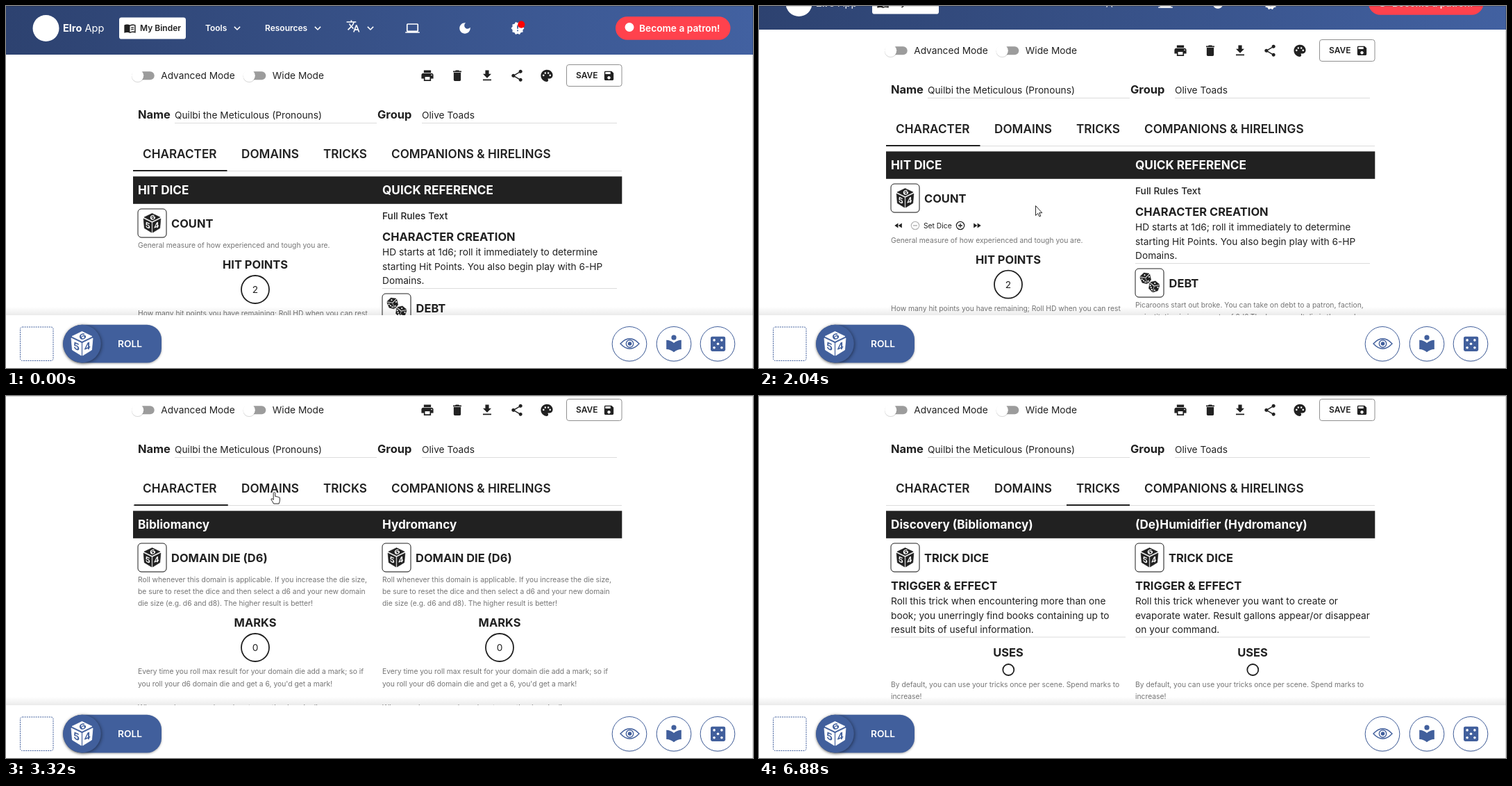
Recreate the animation shown at these times as an HTML page. Size 1076 by 521 pixels, loop 7560 ms.

```html
<!DOCTYPE html>
<html lang="en">
<head>
<meta charset="utf-8">
<title>Character sheet</title>
<style>
  html, body { margin: 0; width: 100%; height: 100%; overflow: hidden; background: #fff; }
  svg { display: block; width: 100%; height: 100%; font-family: Inter, "Open Sans", sans-serif; }
</style>
</head>
<body>
<svg id="stage" viewBox="0 0 1076 521"></svg>
<script>
const LOOP = 7560, TICK = 40;
const INK = '#212121', BLUE = '#415f9c', GREY = '#757575', LINE = '#dcdcdc';
const BODY = 13.73, SMALL = 10.3, LABEL = 16.47, TITLE = 17.16, BUTTON = 12.01;
const LEFT = 190, RIGHT = 542, GAP = 352;

const ICON = {
  print: 'M19 8H5c-1.66 0-3 1.34-3 3v6h4v4h12v-4h4v-6c0-1.66-1.34-3-3-3zm-3 11H8v-5h8v5zm3-7c-.55 0-1-.45-1-1s.45-1 1-1 1 .45 1 1-.45 1-1 1zm-1-9H6v4h12V3z',
  bin: 'M6 19c0 1.1.9 2 2 2h8c1.1 0 2-.9 2-2V7H6v12zM19 4h-3.5l-1-1h-5l-1 1H5v2h14V4z',
  download: 'M19 9h-4V3H9v6H5l7 7 7-7zM5 18v2h14v-2H5z',
  share: 'M18 16.08c-.76 0-1.44.3-1.96.77L8.91 12.7c.05-.23.09-.46.09-.7s-.04-.47-.09-.7l7.05-4.11c.54.5 1.25.81 2.04.81 1.66 0 3-1.34 3-3s-1.34-3-3-3-3 1.34-3 3c0 .24.04.47.09.7L8.04 9.81C7.5 9.31 6.79 9 6 9c-1.66 0-3 1.34-3 3s1.34 3 3 3c.79 0 1.5-.31 2.04-.81l7.12 4.16c-.05.21-.08.43-.08.65 0 1.61 1.31 2.92 2.92 2.92s2.92-1.31 2.92-2.92-1.31-2.92-2.92-2.92z',
  palette: 'M12 2C6.49 2 2 6.49 2 12s4.49 10 10 10c1.38 0 2.5-1.12 2.5-2.5 0-.61-.23-1.2-.64-1.67-.08-.1-.13-.21-.13-.33 0-.28.22-.5.5-.5H16c3.31 0 6-2.69 6-6 0-4.96-4.49-9-10-9zm5.5 11a1.5 1.5 0 1 1 0-3 1.5 1.5 0 0 1 0 3zm-3-4a1.5 1.5 0 1 1 0-3 1.5 1.5 0 0 1 0 3zM5 11.5a1.5 1.5 0 0 1 3 0 1.5 1.5 0 0 1-3 0zm3-4a1.5 1.5 0 0 1 3 0 1.5 1.5 0 0 1-3 0z',
  save: 'M17 3H5c-1.11 0-2 .9-2 2v14c0 1.1.89 2 2 2h14c1.1 0 2-.9 2-2V7l-4-4zm-5 16c-1.66 0-3-1.34-3-3s1.34-3 3-3 3 1.34 3 3-1.34 3-3 3zm3-10H5V5h10v4z',
  more: 'M16.59 8.59L12 13.17 7.41 8.59 6 10l6 6 6-6z',
  language: 'M12.87 15.07l-2.54-2.51.03-.03c1.74-1.94 2.98-4.17 3.71-6.53H17V4h-7V2H8v2H1v1.99h11.17C11.5 7.92 10.44 9.75 9 11.35 8.07 10.32 7.3 9.19 6.69 8h-2c.73 1.63 1.73 3.17 2.98 4.56l-5.09 5.02L4 19l5-5 3.11 3.11.76-2.04zM18.5 10h-2L12 22h2l1.12-3h4.75L21 22h2l-4.5-12zm-2.62 7l1.62-4.33L19.12 17h-3.24z',
  laptop: 'M20 18c1.1 0 2-.9 2-2V6c0-1.1-.9-2-2-2H4c-1.1 0-2 .9-2 2v10c0 1.1.9 2 2 2H0v2h24v-2h-4zM4 6h16v10H4V6z',
  moon: 'M12 3c-4.97 0-9 4.03-9 9s4.03 9 9 9 9-4.03 9-9c0-.46-.04-.92-.1-1.36-.98 1.37-2.58 2.26-4.4 2.26-2.98 0-5.4-2.42-5.4-5.4 0-1.81.89-3.42 2.26-4.4-.44-.06-.9-.1-1.36-.1z',
  news: 'M23 12l-2.44-2.78.34-3.68-3.61-.82-1.89-3.18L12 3 8.6 1.54 6.71 4.72l-3.61.81.34 3.68L1 12l2.44 2.78-.34 3.69 3.61.82 1.89 3.18L12 21l3.4 1.46 1.89-3.18 3.61-.82-.34-3.68L23 12zm-10 5h-2v-2h2v2zm0-4h-2V7h2v6z',
  book: 'M12 6C10.5 4.9 8.4 4.5 6.5 4.5S2.5 4.9 1 6v15.2C2.6 20.4 4.6 20 6.5 20s4 .4 5.5 1.5c1.4-.9 3.8-1.5 5.5-1.5s3.9.4 5.5 1.2V6c-1.5-1.1-3.6-1.5-5.5-1.5S13.5 4.9 12 6zm9 12.5c-2.7-.8-6.5-.5-9 1V8c2.5-1.5 6.3-1.8 9-1v11.5zM14 10.5q3-1.2 5.5-.7v1.5q-2.5-.4-5.5.8zm0 3.5q3-1.2 5.5-.7v1.5q-2.5-.4-5.5.8z',
  back: 'M11 18V6l-8.5 6 8.5 6zm.5-6l8.5 6V6l-8.5 6z',
  forward: 'M4 18l8.5-6L4 6v12zm9-12v12l8.5-6L13 6z',
  reader: 'M12 11.55C9.64 9.35 6.48 8 3 8v11c3.48 0 6.64 1.35 9 3.55 2.36-2.19 5.52-3.55 9-3.55V8c-3.48 0-6.64 1.35-9 3.55zM12 8a3 3 0 1 0 0-6 3 3 0 0 0 0 6z'
};

const icon = (name, x, y, s = .858, fill = INK) =>
  `<path d="${ICON[name]}" fill="${fill}" fill-rule="evenodd" transform="translate(${x} ${y}) scale(${s}) translate(-12 -12)"/>`;
const text = (s, x, y, size, fill = INK, weight = 400, anchor = 'start') =>
  `<text x="${x}" y="${y}" font-size="${size}" fill="${fill}" font-weight="${weight}" text-anchor="${anchor}">${s.replace(/&/g, '&amp;')}</text>`;
const semi = (s, x, y, size, fill = INK) => text(s, x, y, size, fill, 600);
const label = (s, x, y, anchor) => text(s, x, y, LABEL, INK, 700, anchor);
const lines = (list, x, y, size, step, fill) =>
  list.map((s, i) => text(s, x, y + i * step, size, fill)).join('');
const note = (list, x, y) => lines(list, x, y, SMALL, 17.1, GREY);
const para = (list, x, y) => lines(list, x, y, BODY, 20.6, INK);
const rect = (x, y, w, h, r, attrs) => `<rect x="${x}" y="${y}" width="${w}" height="${h}" rx="${r}" ${attrs}/>`;
const circle = (x, y, r, attrs) => `<circle cx="${x}" cy="${y}" r="${r}" ${attrs}/>`;
const rule = (x1, x2, y) => `<path d="M${x1} ${y}H${x2}" stroke="${LINE}"/>`;

// Cube marked with numerals, or with pips when spots is set
function die(x, y, s, fill, mark, turn = 0, spots = false) {
  const num = (n, m) =>
    `<text transform="${m}" font-size="14" font-weight="700" fill="${mark}" text-anchor="middle">${n}</text>`;
  const pips = [[0, -10.5], [-11.5, -1], [-8, 4.5], [-4.5, 10], [4.5, 10], [11.5, -1]]
    .map(p => circle(p[0], p[1], 2.2, `fill="${mark}"`)).join('');
  const faces = 'M0-17.5 14.5-10.5 0-3.5-14.5-10.5ZM-15.5-8-1-1V17L-14 9ZM15.5-8 1-1V17L14 9Z';
  return `<g transform="translate(${x} ${y}) rotate(${turn}) scale(${s})">
    <path d="${faces}" fill="${fill}" stroke="${fill}" stroke-width=".8" stroke-linejoin="round"/>
    ${spots ? pips : num(6, 'translate(2.5 -6.5) rotate(-24) scale(1.15 .8)')
      + num(5, 'translate(-7.8 9) skewY(24)') + num(4, 'translate(7.8 9) skewY(-24)')}
  </g>`;
}
const dieButton = (x, y, pair) =>
  rect(x + .5, y + 1, 41, 41, 5, 'fill="#000" opacity=".18"')
  + rect(x, y, 41, 41, 5, `fill="#fff" stroke="${INK}"`)
  + (pair ? die(x + 15, y + 14, .48, INK, '#fff', -18, true) + die(x + 27, y + 26, .48, INK, '#fff', 14, true)
          : die(x + 20.5, y + 20.5, .8, INK, '#fff'));
const ring = (x, y, r, s = '') =>
  circle(x, y, r, `fill="#fff" stroke="${INK}" stroke-width="1.8"`) + text(s, x, y + 5, BODY, INK, 400, 'middle');
const heads = (a, b) =>
  text(a, LEFT, 271.2, TITLE, '#fff', 700) + text(b, RIGHT, 271.2, TITLE, '#fff', 700);

function navBar() {
  const chevrons = [333, 449, 525].map(x => icon('more', x, 32, .78, '#fff')).join('');
  return rect(0, 0, 1076, 70, 0, 'fill="url(#nav)"')
    + circle(57.5, 32, 19, 'fill="#fff"')
    + text('Elro', 82, 37, 14.6, '#fff', 700) + text('App', 113.5, 37, 14.6, '#fff')
    + rect(163, 16.4, 96, 31.2, 3.4, 'fill="#fff"') + icon('book', 178.5, 32, .74) + semi('My Binder', 193, 36.3, BUTTON)
    + semi('Tools', 287, 36.3, BUTTON, '#fff') + semi('Resources', 373, 36.3, BUTTON, '#fff') + chevrons
    + icon('language', 500, 29, .858, '#fff') + icon('laptop', 585.5, 32, .858, '#fff')
    + icon('moon', 661, 32, .858, '#fff') + icon('news', 737, 32, .858, '#fff')
    + circle(742.3, 26.7, 5.1, 'fill="#f00"')
    + rect(878, 15.3, 165.5, 33.4, 16.7, 'fill="#ff424d"') + circle(898, 30.5, 6.5, 'fill="#fff"')
    + semi('Become a patron!', 912, 36.8, BODY, '#fff');
}

function sheetTop() {
  const toggle = (x, s) => rect(x - 3, 94.2, 27, 12, 6, 'fill="#9c9c9c"')
    + circle(x, 101.3, 8.8, 'fill="#000" opacity=".16"') + circle(x, 100.3, 8.6, 'fill="#fff"')
    + text(s, x + 33.5, 105, BODY);
  const tools = ['print', 'bin', 'download', 'share', 'palette'].map((n, i) => icon(n, 607 + i * 43, 100.3)).join('');
  const tabs = [['CHARACTER', 197], ['DOMAINS', 339], ['TRICKS', 457], ['COMPANIONS & HIRELINGS', 555]]
    .map(([s, x]) => semi(s, x, 219.2, TITLE)).join('');
  return toggle(189.7, 'Advanced Mode') + toggle(350.3, 'Wide Mode') + tools
    + rect(807.5, 84.5, 79.5, 31, 3.4, 'fill="#fff" stroke="#909090"')
    + semi('SAVE', 821, 104.3, BUTTON) + icon('save', 868.5, 100.3, .74)
    + label('Name', LEFT, 162) + text('Quilbi the Meticulous (Pronouns)', 243, 162, BODY) + rule(243, 534, 168.5)
    + label('Group', 535, 162) + text('Olive Toads', 599, 162, BODY) + rule(599, 880, 168.5)
    + tabs + rule(183, 887, 237.5)
    + rect(183, 236, 135.5, 2, 0, `id="marker" fill="${INK}"`)
    + rect(183, 245.3, 704.3, 39.5, 0, `fill="${INK}"`);
}

function characterTab() {
  const round = (x, colour, d) => circle(x, 352, 5.7, `fill="none" stroke="${colour}" stroke-width="1.2"`)
    + `<path d="${d}" transform="translate(${x} 352)" stroke="${colour}" stroke-width="1.3"/>`;
  return heads('HIT DICE', 'QUICK REFERENCE')
    + dieButton(LEFT, 292) + label('COUNT', 238, 319)
    + `<g clip-path="url(#fold)">${icon('back', 201, 352, .6)}${round(225, '#b5b5b5', 'M-3 0H3')}
       ${text('Set Dice', 237, 356, SMALL)}${round(290, INK, 'M-3 0H3M0-3V3')}${icon('forward', 314, 352, .6)}</g>`
    + `<g id="below">${note(['General measure of how experienced and tough you are.'], LEFT, 348)}
       ${label('HIT POINTS', 359, 378.4, 'middle')}${ring(359, 408, 20, '2')}
       ${note(['How many hit points you have remaining; Roll HD when you can rest',
          'in relative safely for a week: if the result is higher than your current',
          "HP, that's your new HP!"], LEFT, 446.3)}</g>`
    + text('Full Rules Text', RIGHT, 306.6, BODY, INK, 500)
    + label('CHARACTER CREATION', RIGHT, 338)
    + para(['HD starts at 1d6; roll it immediately to determine',
        'starting Hit Points. You also begin play with 6-HP', 'Domains.'], RIGHT, 359)
    + rule(RIGHT, 880, 406.5)
    + dieButton(RIGHT, 414, true) + label('DEBT', 590.5, 440.5)
    + note(['Picaroons start out broke. You can take on debt to a patron, faction,',
        'or institution in increments of 2d6.The lower result die is the number',
        'of domains you get from your guarantor, the higher is how many',
        'd6×100 silver of debt you need to clear. Picaroons can always seek'], RIGHT, 469.8);
}

const twice = col => col + `<g transform="translate(${GAP} 0)">${col}</g>`;

function domainsTab() {
  return heads('Bibliomancy', 'Hydromancy') + twice(
    dieButton(LEFT, 292) + label('DOMAIN DIE (D6)', 238, 319)
    + note(['Roll whenever this domain is applicable. If you increase the die size,',
        'be sure to reset the dice and then select a d6 and your new domain',
        'die size (e.g. d6 and d8). The higher result is better!'], LEFT, 348)
    + label('MARKS', 359, 412.4, 'middle') + ring(359, 442, 20, '0')
    + note(['Every time you roll max result for your domain die add a mark; so if',
        "you roll your d6 domain die and get a 6, you'd get a mark!", '',
        'When you have enough marks, step up the domain die or'], LEFT, 480.4));
}

function tricksTab() {
  return heads('Discovery (Bibliomancy)', '(De)Humidifier (Hydromancy)') + twice(
    dieButton(LEFT, 292) + label('TRICK DICE', 238, 319) + label('TRIGGER & EFFECT', LEFT, 358.6)
    + rule(LEFT, 528, 427) + label('USES', 359, 454.8, 'middle') + ring(359.3, 474, 8)
    + note(['By default, you can use your tricks once per scene. Spend marks to', 'increase!'], LEFT, 499))
    + para(['Roll this trick when encountering more than one',
        'book; you unerringly find books containing up to', 'result bits of useful information.'], LEFT, 380)
    + para(['Roll this trick whenever you want to create or',
        'evaporate water. Result gallons appear/or disappear', 'on your command.'], RIGHT, 380);
}

function dock() {
  const knobs = [898, 962, 1025].map(x => circle(x, 487, 25.5, 'fill="#000" opacity=".08"')
    + circle(x, 486.3, 24.8, `fill="#fff" stroke="${BLUE}"`)).join('');
  const pips = [[-5.4, -5.4], [5.4, -5.4], [0, 0], [-5.4, 5.4], [5.4, 5.4]]
    .map(([x, y]) => circle(1025.5 + x, 486.3 + y, 1.8, 'fill="#fff"')).join('');
  return rect(0, 433, 1076, 12, 0, 'fill="url(#shade)"') + rect(0, 445, 1076, 76, 0, 'fill="#fff"')
    + rect(20.5, 462, 47.5, 48.5, 3, `fill="none" stroke="${BLUE}" stroke-dasharray="2 1.2"`)
    + `<path d="M109.5 458.8H203a21 21 0 0 1 21 21V492.5a21 21 0 0 1-21 21H109.5a27.3 27.3 0 0 1 0-54.7Z" fill="${BLUE}" style="filter:drop-shadow(0 1px 1.5px #0005)"/>`
    + circle(109.5, 486.1, 27.3, `fill="${BLUE}" style="filter:drop-shadow(1px 1px 2.5px #0007)"`)
    + die(109.5, 486, 1, '#fff', BLUE) + semi('ROLL', 161, 490.7, BODY, '#fff')
    + knobs
    + `<path d="M885 486Q898.5 471.5 912 486Q898.5 500.5 885 486Z" fill="none" stroke="${BLUE}" stroke-width="1.4"/>`
    + circle(898.5, 486, 5.2, `fill="none" stroke="${BLUE}" stroke-width="1.4"`) + circle(898.5, 486, 2.8, `fill="${BLUE}"`)
    + icon('reader', 962, 485.6, 1.2, BLUE) + rect(1015, 475.7, 21.2, 21.2, 2.4, `fill="${BLUE}"`) + pips;
}

const stage = document.getElementById('stage');
stage.innerHTML = `<defs>
  <linearGradient id="nav"><stop stop-color="#2d4270"/><stop offset="1" stop-color="#4261a1"/></linearGradient>
  <linearGradient id="shade" x2="0" y2="1"><stop stop-color="#000" stop-opacity="0"/><stop offset="1" stop-color="#000" stop-opacity=".08"/></linearGradient>
  <clipPath id="fold"><rect id="foldBox" x="185" y="337" width="150" height="0"/></clipPath></defs>
  <g id="page">${navBar()}${sheetTop()}
    <g class="tab">${characterTab()}</g><g class="tab">${domainsTab()}</g><g class="tab">${tricksTab()}</g></g>
  ${circle(0, 0, 10.5, 'id="ripple" fill="#212121" opacity=".12"')}
  ${dock()}
  <path d="M0 .5H1075.5V521" fill="none" stroke="#000" stroke-opacity=".16"/>
  <path id="pointer" fill="#fff" stroke="#111" stroke-width=".9" stroke-linejoin="round"/>`;

const $ = id => document.getElementById(id);
const page = $('page'), marker = $('marker'), foldBox = $('foldBox'), below = $('below');
const ripple = $('ripple'), pointer = $('pointer'), panes = [...document.querySelectorAll('.tab')];

const ARROW = 'M.5.5V14.5L3.7 11.5 5.9 16 7.8 15.2 5.7 10.7H9.8Z';
const HAND = 'M-1.3 7V1.3Q0-.5 1.3 1.3V6.5Q2.7 5.7 3.6 7.1Q5 6.4 5.8 7.7Q7.6 7.2 7.9 9V12.2Q7.7 14.5 6.6 17H-1Q-2.4 13.8-4.6 11Q-4.5 9.2-2.7 9.9L-1.3 11.3Z';

// [time, x, y]; each pose holds until the next
const PATH = [
  [320, 837, 474], [400, 800, 450], [480, 705, 380], [560, 600, 308], [640, 500, 262], [720, 400, 245],
  [800, 330, 242], [840, 311, 244], [880, 318, 253], [920, 345, 269], [1000, 375, 281], [1040, 387, 285],
  [1120, 398, 287], [2520, 397, 270], [2600, 393, 225], [2680, 389, 180], [2760, 387, 150], [2800, 386.5, 138],
  [3800, 395, 138], [3880, 430, 138], [3960, 465, 138], [4040, 475, 138],
  [5920, 478, 142], [6000, 510, 190], [6080, 580, 262], [6120, 640, 318], [6200, 720, 385], [6280, 785, 432],
  [6360, 822, 457], [6400, 834, 463], [6600, 829, 463], [6680, 845, 478], [6760, 868, 496], [6840, 900, 513], [6880]
];
const SCROLL = [[0, 0], [1520, 6], [1560, 24], [1640, 36], [2280, 62], [2320, 80]];
const TABS = [[0, 0], [3320, 1], [5000, 2]];
const SPANS = [[183, 318.5], [325, 436], [443, 534]];
const CLICKS = [3120, 4920];

const at = (table, t) => table.filter(row => row[0] <= t).pop();

// cubic-bezier(.4, 0, .2, 1)
function ease(p) {
  if (p <= 0 || p >= 1) return p <= 0 ? 0 : 1;
  let lo = 0, hi = 1, u = .5;
  for (let i = 0; i < 20; i++) {
    u = (lo + hi) / 2;
    const x = 1.2 * u * (1 - u) ** 2 + .6 * u * u * (1 - u) + u ** 3;
    if (x < p) lo = u; else hi = u;
  }
  return u * u * (3 - 2 * u);
}

function draw(ms) {
  const t = Math.floor(ms / TICK) * TICK;
  page.setAttribute('transform', `translate(0 ${-at(SCROLL, t)[1]})`);

  const open = 37 * ease((t - 1890) / 300);
  foldBox.setAttribute('height', open);
  below.setAttribute('transform', `translate(0 ${open})`);

  const [start, tab] = at(TABS, t);
  panes.forEach((pane, i) => pane.style.display = i === tab ? '' : 'none');
  const from = SPANS[Math.max(tab - 1, 0)], to = SPANS[tab], k = ease((t - start + 20) / 300);
  const [a, b] = from.map((v, i) => v + (to[i] - v) * k);
  marker.setAttribute('x', a);
  marker.setAttribute('width', b - a);

  const [, x, y] = at(PATH, t) || [];
  const shown = x !== undefined;
  pointer.style.display = shown ? '' : 'none';
  ripple.style.display = CLICKS.includes(t) ? '' : 'none';
  if (shown) {
    pointer.setAttribute('d', y < 158 ? HAND : ARROW);
    pointer.setAttribute('transform', `translate(${x} ${y})`);
    ripple.setAttribute('transform', `translate(${x} ${y + .5})`);
  }
}

const begin = performance.now();
function frame() {
  draw((performance.now() - begin) % LOOP);
  requestAnimationFrame(frame);
}
frame();
</script>
</body>
</html>
```
